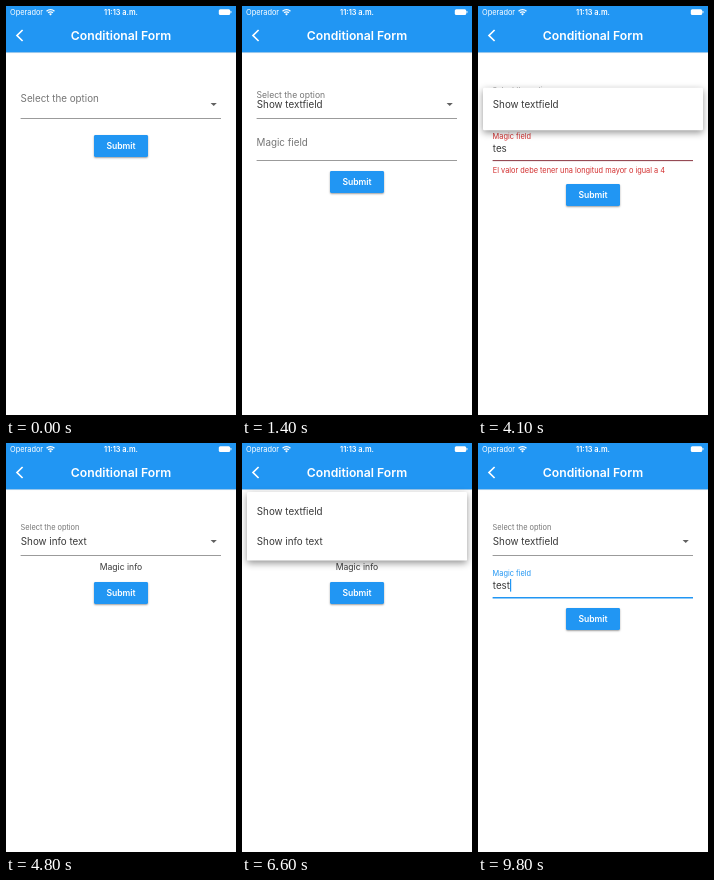
An HTML page with a canvas that plays this animation: 230x409 px, repeating every 10 s.

```html
<!DOCTYPE html>
<html lang="en">
<head>
<meta charset="utf-8">
<title>Conditional Form</title>
<style>
  html, body { margin: 0; width: 100%; height: 100%; overflow: hidden; background: #fff; }
  canvas { display: block; width: 230px; height: 409px; }
</style>
</head>
<body>
<canvas id="stage"></canvas>
<script>
const W = 230, H = 409, LOOP = 10000, STEP = 100;
const canvas = document.getElementById('stage');
const ctx = canvas.getContext('2d');
const dpr = window.devicePixelRatio || 1;
canvas.width = W * dpr;
canvas.height = H * dpr;

const BLUE = [33, 150, 243], RED = [211, 47, 47], GREY = [117, 117, 117];
const LINE = [155, 155, 155], INK = 'rgba(0,0,0,.78)';
const BODY = 9.8, SMALL = 7.36;
const ITEMS = ['Show textfield', 'Show info text'];
const ITEM_H = 29.4, PAD = 4.9;
const MENUS = [
  { open: 400, close: 1400, selected: 0 },
  { open: 4000, close: 4800, selected: 0 },
  { open: 6200, close: 7400, selected: 1 }
];
const PRESSES = [[3300, 500], [5600, 300], [9300, 500]];
const TYPED = [[2400, 1], [2500, 2], [2700, 3], [8800, 4]];

let t = 0;
const clamp = x => Math.max(0, Math.min(1, x));
const ramp = (start, length) => clamp((t - start) / length);
const lerp = (a, b, k) => a + (b - a) * k;
const within = (a, b) => t >= a && t < b;
const mix = (a, b, k) => a.map((v, i) => lerp(v, b[i], k));
const rgb = c => `rgb(${c.map(Math.round)})`;

function text(str, x, y, size, color, weight = 400, align = 'left') {
  ctx.font = `${weight} ${size}px Inter, sans-serif`;
  ctx.textAlign = align;
  ctx.fillStyle = color;
  ctx.fillText(str, x, y);
}

function rect(x, y, w, h, color) {
  ctx.fillStyle = color;
  ctx.fillRect(x, y, w, h);
}

function roundRect(x, y, w, h, r, color) {
  ctx.beginPath();
  ctx.roundRect(x, y, w, h, r);
  ctx.fillStyle = color;
  ctx.fill();
}

function shadow(dy, blur, alpha) {
  ctx.shadowOffsetY = dy * dpr;
  ctx.shadowBlur = blur * dpr;
  ctx.shadowColor = `rgba(0,0,0,${alpha})`;
}

function shape(points, close) {
  ctx.beginPath();
  points.forEach(p => ctx.lineTo(...p));
  if (close) ctx.closePath();
}

function label(str, restY, floatY, k, color) {
  text(str, 14.6, lerp(restY, floatY, k), lerp(BODY, SMALL, k), color);
}

function header() {
  ctx.save();
  shadow(.6, 1.5, .25);
  rect(0, 0, W, 46.4, rgb(BLUE));
  ctx.restore();

  text('Operador', 4, 9.2, 7.4, '#fff');
  text('11:13 a.m.', 115, 9.2, 7.4, '#fff', 600, 'center');
  ctx.strokeStyle = '#fff';
  ctx.lineWidth = 1.3;
  for (const r of [5.6, 3.4]) {
    ctx.beginPath();
    ctx.arc(44.5, 9.2, r, -Math.PI * .75, -Math.PI * .25);
    ctx.stroke();
  }
  ctx.fillStyle = '#fff';
  ctx.beginPath();
  ctx.moveTo(44.5, 9.4);
  ctx.arc(44.5, 9.4, 2, -Math.PI * .75, -Math.PI * .25);
  ctx.fill();
  roundRect(212.8, 3.2, 11.4, 5.8, 1.5, '#fff');
  roundRect(224.5, 5, .9, 2.2, .4, '#fff');

  ctx.lineWidth = 1.7;
  shape([[16.6, 24], [11, 29.5], [16.6, 35]]);
  ctx.stroke();
  text('Conditional Form', 115, 33.8, 12.2, '#fff', 600, 'center');
}

function dropdown(value) {
  label('Select the option', 96.4, 87.2, ramp(1300, 200), rgb(GREY));
  if (value) text(value, 14.8, 101.5, BODY, INK);
  shape([[204.6, 97], [210.8, 97], [207.7, 100.1]], true);
  ctx.fillStyle = '#616161';
  ctx.fill();
  rect(14.6, 112, 200.4, 1, rgb(LINE));
}

function cursorAlpha() {
  for (const start of [3300, 9300]) {
    if (within(start, start + 500)) return 1 - ramp(start, 250);
  }
  return 1;
}

function field(invalid) {
  const again = t >= 7400;
  const focused = within(2000, 4000) || t >= 8200;
  const float = again ? 1 : ramp(1950, 200);
  const focus = again ? ramp(8150, 200) : float * (1 - ramp(3950, 200));
  const bad = invalid ? ramp(3280, 300) : 0;

  label('Magic field', 140.4, 132.6, float,
    rgb(mix(mix(GREY, BLUE, focus), RED, bad)));

  const count = TYPED.reduce((n, [at, k]) => t >= at ? k : n, 0);
  const value = 'test'.slice(0, count);
  text(value, 14.8, 145.5, BODY, INK);
  if (focused) {
    ctx.globalAlpha = cursorAlpha();
    rect(14.8 + ctx.measureText(value).width, 136, 1.2, 12.6, rgb(BLUE));
    ctx.globalAlpha = 1;
  }

  const color = t >= 4000 && !again ? [150, 75, 85] : mix(mix(LINE, BLUE, focus), RED, bad);
  rect(14.6, 154, 200.4, lerp(1, 1.5, focus), rgb(color));

  if (invalid) {
    const shown = ramp(3280, 200);
    ctx.globalAlpha = shown;
    text('El valor debe tener una longitud mayor o igual a 4',
      14.8, lerp(164.9, 166.7, shown), SMALL, rgb(RED));
    ctx.globalAlpha = 1;
  }
}

function submit(y) {
  const press = PRESSES.find(([at, length]) => within(at, at + length));
  const lift = press ? 1 - ramp(press[0] + 50, press[1] - 100) : 0;
  ctx.save();
  shadow(lerp(1, 2.4, lift), lerp(2, 5, lift), .38);
  roundRect(88, y, 54, 22, 1.4, rgb(BLUE));
  ctx.restore();
  if (press) {
    const [at, length] = press;
    ctx.save();
    ctx.beginPath();
    ctx.rect(88, y, 54, 22);
    ctx.clip();
    ctx.beginPath();
    ctx.arc(106, y + 1, 13 + (t - at) * .12, 0, Math.PI * 2);
    ctx.fillStyle = `rgba(255,255,255,${.2 * (1 - ramp(at + 50, length - 50))})`;
    ctx.fill();
    ctx.restore();
  }
  text('Submit', 115, y + 14.1, 8.6, '#fff', 600, 'center');
}

// The panel fades in, unfolds from the selected row, then shows the other rows.
function menu({ open, selected }) {
  const p = ramp(open, 300);
  const unfold = clamp((p - .25) / .25);
  const rowTop = 98 - ITEM_H / 2;
  const endTop = rowTop - selected * ITEM_H - PAD;
  const top = lerp(rowTop, endTop, unfold);
  const bottom = lerp(rowTop + ITEM_H, endTop + 2 * (ITEM_H + PAD), unfold);

  ctx.save();
  ctx.globalAlpha = clamp(p / .25);
  ctx.save();
  shadow(2.6, 7, .42);
  roundRect(5, top, 220, bottom - top, 1.2, '#fff');
  ctx.restore();
  ctx.beginPath();
  ctx.rect(5, top, 220, bottom - top);
  ctx.clip();
  ITEMS.forEach((name, i) => {
    if (i !== selected) ctx.globalAlpha = clamp((p - .5 - (i + 1) / 7) * 14 / 3);
    text(name, 14.8, 101.5 + (i - selected) * ITEM_H, BODY, INK);
    ctx.globalAlpha = clamp(p / .25);
  });
  ctx.restore();
}

function draw() {
  const info = within(4800, 7400);
  const hasField = t >= 1400 && !info;
  const invalid = within(3300, 4800);

  ctx.setTransform(dpr, 0, 0, dpr, 0, 0);
  rect(0, 0, W, H, '#fff');
  header();
  dropdown(t < 1400 ? '' : ITEMS[info ? 1 : 0]);
  if (hasField) field(invalid);
  if (info) text('Magic info', 115, 127.2, 8.6, INK, 400, 'center');
  submit(t < 1400 ? 129 : info ? 139 : invalid ? 178 : 165);
  const active = MENUS.find(m => within(m.open, m.close));
  if (active) menu(active);
}

const begin = performance.now();
function tick() {
  t = Math.floor(((performance.now() - begin) % LOOP) / STEP) * STEP;
  draw();
  requestAnimationFrame(tick);
}
tick();
</script>
</body>
</html>
```
